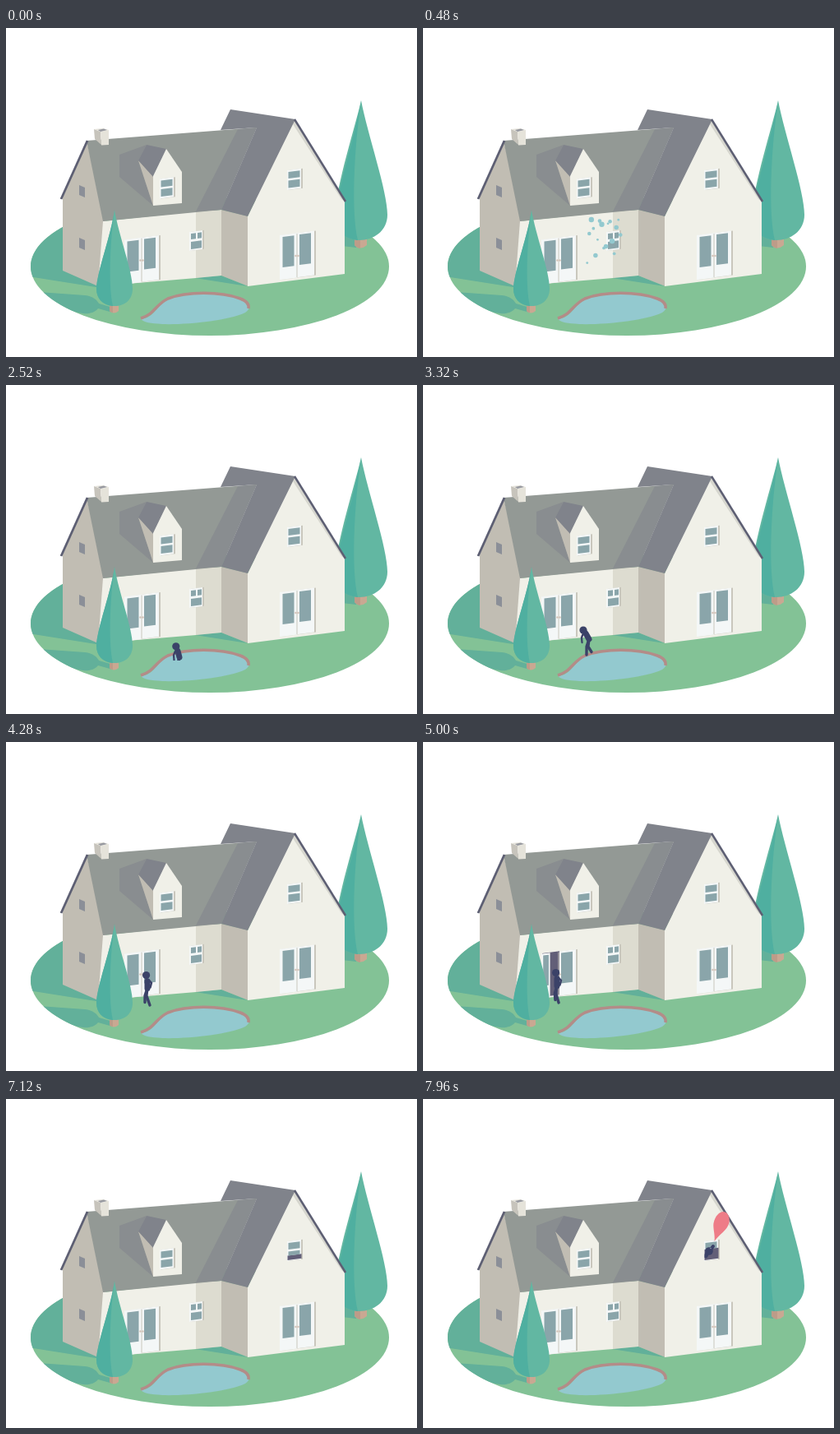
Write an HTML page with a canvas that moves like this. It is 500x400 px and loops after 8 s.

```html
<!DOCTYPE html>
<html lang="en">
<head>
<meta charset="utf-8">
<title>House and pool</title>
<style>
html, body { margin: 0; width: 100%; height: 100%; overflow: hidden; background: #fff; }
canvas { display: block; }
</style>
</head>
<body>
<canvas id="stage" width="500" height="400"></canvas>
<script>
const ctx = document.getElementById('stage').getContext('2d');
const LOOP = 8000;
const WALL = '#f0f0e8', SIDE = '#c1bdb3', SLATE = '#80838b', TRIM = '#5d5f73';
const FRAME = '#f4f7f7', GLASS = '#8aa5aa', EDGE = '#c9c7bd', DARK = '#625f78';
const SHADE = '#62b09a', WATER = '#93c9cf', NAVY = '#3b4268';

const clamp = v => Math.max(0, Math.min(1, v));
const ramp = (t, a, b) => clamp((t - a) / (b - a));
const mix = (a, b, p) => a + (b - a) * p;

function fill(path, color) {
  ctx.fillStyle = color;
  ctx.fill(new Path2D(path));
}
function line(path, color, width, cap = 'butt') {
  ctx.strokeStyle = color;
  ctx.lineWidth = width;
  ctx.lineCap = cap;
  ctx.lineJoin = 'round';
  ctx.stroke(new Path2D(path));
}
function dot(x, y, r, color) {
  ctx.fillStyle = color;
  ctx.beginPath();
  ctx.arc(x, y, r, 0, 7);
  ctx.fill();
}
// Upright panel whose horizontal edges follow the wall's perspective.
function pane(x, y, w, h, color, slope = 0.13) {
  fill(`M${x} ${y}l${w} ${-w * slope}v${h}l${-w} ${w * slope}z`, color);
}

function ground() {
  ctx.save();
  const disc = new Path2D();
  disc.ellipse(248, 290, 218, 84, 0, 0, 7);
  ctx.fillStyle = '#83c296';
  ctx.fill(disc);
  ctx.clip(disc);
  fill('M20 301L122 317V220H20z', SHADE);
  fill('M40 321L96 325C106 326 111 331 113 335L130 340V346L112 341C108 346 101 348 94 347C76 345 61 337 44 322z', SHADE);
  fill('M400 250H426V267L400 264z', SHADE);
  ctx.restore();
}

function bigTree() {
  fill('M424 255H439V264Q431 271 424 264z', '#c9a892');
  fill('M424 255H431V268Q426 267 424 264z', '#bd9c89');
  fill('M432 88C440 130 464 198 464 227C464 247 447 258 430 258C412 257 400 247 400 228C402 190 425 120 432 88', '#62b7a2');
  fill('M432 88C425 130 405 190 400 228C400 247 412 256 428 258C420 225 423 150 432 88', '#4fafa0');
}

function smallTree() {
  fill('M126 335H137V344Q131 349 126 344z', '#c9a892');
  fill('M126 335H130V346Q127 346 126 344z', '#bd9c89');
  fill('M132 221C137 252 154 295 154 317C154 330 145 338 132 338C119 338 110 330 110 317C111 295 128 252 132 221', '#62b7a2');
  fill('M132 221C128 252 111 295 110 317C110 329 118 337 130 338C124 310 127 257 132 221', '#4fafa0');
}

function house() {
  fill('M230 304L262 301L294 314z', SHADE);
  fill('M98 137L69 206V295L112 314H122V236z', SIDE);
  fill('M118 235L231 223V304L112 314z', WALL);
  fill('M231 223L262 221V301L231 304z', '#dddcd0');
  fill('M262 221L295 229V314L262 301z', SIDE);
  fill('M351 112L412 211V299L294 314V229z', WALL);
  fill('M351 112L412 211L408 208L349 117z', '#d6d6ce');
  fill('M98 137L305 121L262 221L118 235z', '#939995');
  fill('M282 123L305 121L262 221L231 223z', '#898d90');
  fill('M273 99L352 111L294 229L262 221L305 121L261 124z', SLATE);
  line('M351 111L413 211', TRIM, 2.5);
  line('M99 137L67 208', TRIM, 2.8);

  fill('M107 123L115 126L116 142L108 135z', '#c7c4bc');
  fill('M115 126L125 124V142L116 142.500z', '#e5e3da');
  fill('M107 123L118 122L125 124L115 126z', '#e5e3da');
  fill('M112 124L119 122.500L123 124L115 126z', '#9799a0');

  fill('M138 154L171 142L161 161L179 216L138 181z', '#898d90');
  fill('M161 161L179 180V216z', SIDE);
  fill('M161 161L171 142L195 147L179 181z', SLATE);
  fill('M195 147L214 175V213L179 216V180z', WALL);

  fill('M89 191L96 194V206L89 203z', '#8b8f98');
  fill('M89 255L96 258V270L89 267z', '#8b8f98');

  sashWindow(187, 183.5, 0);
  pane(224, 248, 17, 23, EDGE);
  pane(223, 248, 16, 23, FRAME);
  pane(225, 250, 6, 7, GLASS);
  pane(233, 249, 5, 7, GLASS);
  pane(225, 260, 13, 9, GLASS);
  doorFrame(333, 252);
  doorLeaf(334, 252, 1);
  doorRight(333, 252);
}

function sashWindow(x, y, open) {
  pane(x + 1, y, 18, 24, EDGE);
  pane(x, y, 17, 24, FRAME);
  pane(x + 1.5, y + 2, 14, 8, GLASS);
  if (open) pane(x + 0.5, y + 23 - 13 * open, 17, 13 * open, DARK);
  if (open < 1) pane(x + 1.5, y + 12.5, 14, 9 * (1 - open), GLASS);
}

function doorFrame(x, y) {
  pane(x + 1, y, 43, 54, EDGE);
  pane(x, y, 42, 54, FRAME);
}
function doorRight(x, y) {
  pane(x + 24, y - 1, 14, 37, GLASS);
  line(`M${x + 21} ${y - 2}v53`, EDGE, 1);
  dot(x + 19.5, y + 25, 1.2, '#d3c2b7');
  dot(x + 22.5, y + 25, 1.2, '#d3c2b7');
}
function doorLeaf(x, y, width) {
  pane(x, y, 20 * width, 54, FRAME);
  pane(x + 2.5 * width, y + 2, 14 * width, 37, GLASS);
}

function pool() {
  fill('M164 354C180 352 181 341 195 331C220 319 260 318 285 328C297 333 299 341 291 346C270 356 220 361 190 360C176 359 168 358 164 354', WATER);
  line('M164 353C182 347 181 337 197 329C220 320 261 320 285 329C293 332 296 336 295 341', '#b38c88', 3.5);
}

// x, y is the ground point under the body; lean bends the torso to the left.
function figure(x, y, lean, stride) {
  const hipY = y - 22 + lean * 0.4;
  const neckX = x - lean, neckY = hipY - 11 + lean * 0.4;
  const leg = (dx, dy) => line(
    `M${x} ${hipY}L${x - 2 + dx * 0.3} ${hipY + 9}L${x + dx} ${y - dy - 1}`, NAVY, 3.4, 'round');
  leg(-3 * stride, 0);
  leg(3 * stride, 3.5);
  line(`M${neckX + 1} ${neckY + 2}L${x} ${hipY}`, NAVY, 7, 'round');
  if (lean > 3) line(`M${neckX - 2} ${neckY + 2}L${neckX - 4} ${neckY + 7}L${neckX - 3.5} ${neckY + 13}`, NAVY, 2.3, 'round');
  else line(`M${neckX + 3} ${neckY + 1}L${neckX + 6} ${neckY + 4}L${x + 3.5} ${hipY - 1}`, NAVY, 2.5, 'round');
  dot(neckX - lean * 0.4, neckY - 6 + lean * 0.8, 4.6, NAVY);
}

function clipped(path, draw) {
  ctx.save();
  ctx.clip(new Path2D(path));
  draw();
  ctx.restore();
}

function fallAndSplash(t) {
  if (t >= 40 && t < 280) {
    clipped('M0 0H500V342H0z', () => figure(220, 76 + (t - 40) * 1.6, 1, 1));
  }
  if (t < 200 || t >= 1040) return;
  const p = ramp(t, 200, 1060);
  for (let i = 0; i < 17; i++) {
    const side = i / 8 - 1;
    const height = 55 + 60 * Math.abs(Math.sin(i * 2.4));
    dot(220 + side * 62 * p, 334 - 4 * height * p * (1 - p), 1.4 + i * 7 % 5 * 0.45, WATER);
  }
}

// time, x, y, lean, waterline
const WALK = [
  [1680, 224, 386, 3, 344],
  [2520, 211, 352, 3, 335],
  [3320, 202, 329, 5, 337],
  [4280, 172, 321, 1, 337],
  [5000, 163, 318, 1, 337],
  [5400, 159, 314, 1, 337],
  [5840, 143, 309, 1, 337]
];

function walker(t, leafEdge) {
  if (t < WALK[0][0] || t >= 5840) return;
  const i = WALK.findIndex(k => t < k[0]) - 1;
  const [a, b] = [WALK[i], WALK[i + 1]];
  const p = ramp(t, a[0], b[0]);
  const [, x, y, lean, level] = a.map((v, j) => mix(v, b[j], p));
  const stride = Math.cos(2 * Math.PI * (t - 3320) / 640);
  const left = t > 5100 ? leafEdge : 0;
  const right = t > 5100 ? 167 : 500;
  clipped(`M${left} 0H${right}V${level}H${left}z`, () => figure(x, y, lean, stride));
}

function balloon(t) {
  if (t < 7430) return;
  const size = ramp(t, 7427, 7960);
  ctx.save();
  ctx.translate(354.5, 173);
  ctx.rotate((1 - size) * 1.17);
  ctx.scale(size, size);
  fill('M0 0C1 -8 -2 -16 -1 -22C1 -31 6 -36 11 -36C17 -35 19 -29 18 -23C16 -13 5 -8 0 0', '#ee7c87');
  ctx.restore();
}

function upstairs(t) {
  const open = ramp(t, 7000, 7280);
  sashWindow(342, 173, open);
  const rise = ramp(t, 7240, 7480);
  if (rise) {
    clipped('M342.500 170H360V193L342.500 196z', () => {
      ctx.translate(0, 16 * (1 - rise));
      line('M344 191L346 187', NAVY, 5, 'round');
      dot(348, 185, 4.8, NAVY);
      line('M350 183L353 179', NAVY, 4, 'round');
      dot(350, 181.5, 0.8, '#8f96b0');
    });
  }
  balloon(t);
}

function draw(t) {
  ctx.fillStyle = '#fff';
  ctx.fillRect(0, 0, 500, 400);
  ground();
  bigTree();
  house();
  const opened = ramp(t, 4300, 4950) - ramp(t, 5880, 6200) * (t > 5920);
  const leafWidth = 1 - 0.52 * opened;
  doorFrame(144, 257.5);
  if (opened > 0) pane(145, 257, 21, 53, DARK);
  doorLeaf(145, 257.5, leafWidth);
  doorRight(144, 257.5);
  pool();
  walker(t, 145 + 20 * leafWidth);
  smallTree();
  upstairs(t);
  fallAndSplash(t);
}

const start = performance.now();
function tick() {
  draw((performance.now() - start) % LOOP);
  requestAnimationFrame(tick);
}
tick();
</script>
</body>
</html>
```
